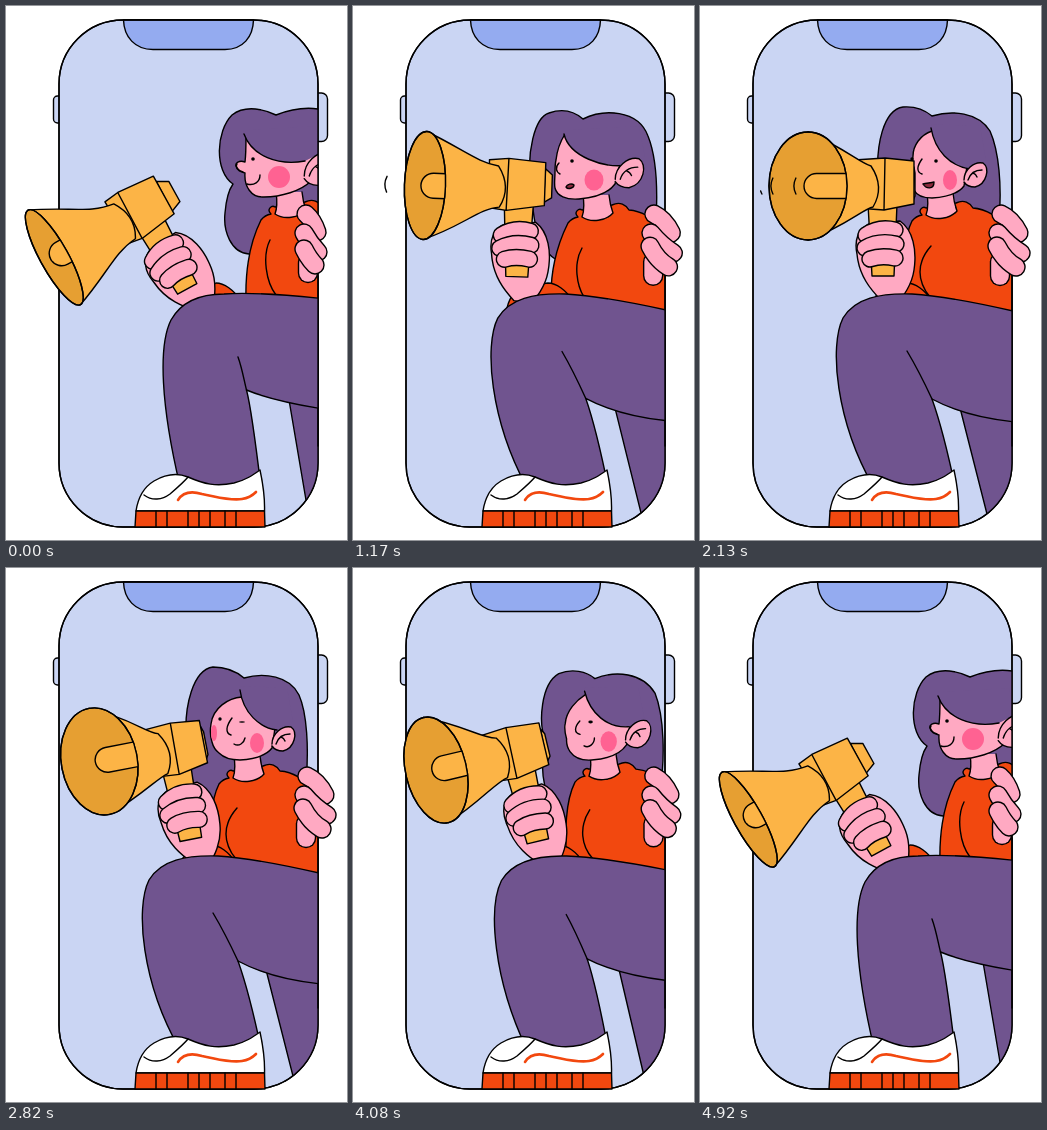
Recreate the animation shown at these times as an HTML page. Size 341 px wide and 534 px high, loop 4950 ms.

```html
<!DOCTYPE html>
<html lang="en">
<head>
<meta charset="utf-8">
<title>Megaphone</title>
<style>
html, body { margin: 0; width: 100%; height: 100%; overflow: hidden; background: #fff; }
svg { display: block; width: 100vw; height: 100vh; }
.ink { stroke: #000; stroke-width: 1.4; stroke-linejoin: round; stroke-linecap: round; }
.line { fill: none; }
.sky { fill: #cad5f3; }
.plum { fill: #70548f; }
.red { fill: #f2480f; }
.skin { fill: #ffa9c2; }
.gold { fill: #fcb446; }
.amber { fill: #e69f32; }
.blush { fill: #ff6292; stroke: none; }
#ear path { vector-effect: non-scaling-stroke; }
</style>
</head>
<body>
<svg viewBox="0 0 341 534">
  <defs>
    <clipPath id="screen"><rect x="53" y="14" width="259" height="507" rx="64"/></clipPath>
    <clipPath id="mouthClip"><ellipse class="mouthShape" ry="54"/></clipPath>
  </defs>

  <g class="ink">
    <rect class="sky" x="47.5" y="90" width="12" height="27" rx="4"/>
    <rect class="sky" x="302" y="87" width="19.5" height="48.5" rx="6"/>
    <rect class="sky" x="53" y="14" width="259" height="507" rx="64"/>
    <path fill="#94abf0" d="M117.5,14C118,31 129,43.5 147,43.5H219C237,43.5 247,31 247.5,14Z"/>
  </g>

  <g clip-path="url(#screen)" class="ink">
    <path id="backLeg" class="plum"/>
    <path id="hair" class="plum"/>
    <path id="shirt" class="red"/>
    <path id="neck" class="skin"/>
    <path id="fold" class="line"/>
    <path id="face" class="skin"/>
    <ellipse id="cheek" class="blush"/>
    <ellipse id="farCheek" class="blush" rx="3" ry="8"/>
    <path id="bangFill" class="plum" stroke="none"/>
    <path id="bang" class="line"/>
    <path id="nose" class="line"/>
    <path id="lips" fill="#8c2a3c"/>
    <ellipse id="eye" stroke="none"/>
    <circle id="farEye" r="1.7" stroke="none"/>
    <g id="ear">
      <path class="skin" d="M-11,6C-11,-4 -1,-13 8,-11C15,-6 12,10 0,13C-5,13 -9,11 -11,8"/>
      <path class="line" d="M-7,6C-5,0 0,-4 7,-4M-2,-1Q1,0 2,3"/>
    </g>
    <path id="sleeve" class="red"/>
  </g>
  <rect class="ink line" x="53" y="14" width="259" height="507" rx="64"/>

  <g id="mega" class="ink">
    <g class="grip">
      <path class="skin" d="M11,37C24,46 28,66 25,86C23,100 14,114 8,118L-8,116C-18,106 -30,92 -32,70C-35,56 -31,44 -18,39Z"/>
      <path class="gold" d="M-21,20L8,20L5,92L-17,92Z"/>
    </g>
    <path id="muzzle" class="gold"/>
    <path id="block" class="gold"/>
    <path id="cone" class="gold"/>
    <g id="mouth">
      <ellipse class="mouthShape amber" ry="54"/>
      <rect class="gold" clip-path="url(#mouthClip)" x="-4" y="-12.5" width="90" height="25" rx="12.5"/>
      <ellipse class="mouthShape line" ry="54"/>
      <g id="waves" class="line"></g>
    </g>
    <g class="grip" id="fist"></g>
  </g>

  <g clip-path="url(#screen)" class="ink">
    <path id="frontLeg" class="plum"/>
    <path id="crease" class="line"/>
  </g>
  <path class="ink line" d="M312,270V440"/>

  <g class="ink">
    <path fill="#fff" d="M130,505C132,492 138,481 148,475C160,468 172,467 182,471C198,478 210,481 228,477C240,474 247,469 254,464C257,478 259,490 258.5,505Z"/>
    <path class="line" d="M138,489C146,495 156,494 164,488C171,482 178,476 182,471"/>
    <path class="line" style="stroke:#f2480f;stroke-width:2.6" d="M172,494C177,486 186,485 196,488C212,491 224,495 236,493C243,492 247,489 250,486"/>
    <path class="red" d="M130,505H258.5L259,521H129Z"/>
    <path class="line" d="M150,505v16M161,505v16M182,505v16M193,505v16M204,505v16M219,505v16M230,505v16"/>
  </g>
  <g id="hold"></g>
</svg>

<script>
const LOOP = 4950;
const TIMES = [0, 570, 1170, 2130, 2800, 3600, 4440, 4905];
const ORDER = [0, 1, 2, 3, 4, 4, 5, 0];
const NUMBER = /-?\d+(\.\d+)?/g;
const $ = id => document.getElementById(id);
const numbers = s => s.match(NUMBER).map(Number);
const fill = (shape, list) => { let i = 0; return shape.replace(NUMBER, () => list[i++].toFixed(2)); };

// Poses: wind-up, call, loud, turned, wink, return
const PATHS = {
  hair: [
    "M270,109C290,101 315,98 335,112C350,150 345,200 330,230L243,248C225,247 217,225 219,207C220,195 222,185 227,178C208,165 210,125 226,109C240,98 260,104 270,109",
    "M243,113C268,101 295,106 312,130C322,150 322,200 312,230L213,252C195,245 193,215 194,200C194,195 194,188 195,184C184,165 185,122 202,112C215,104 235,106 243,113",
    "M230,113C250,103 285,103 295,130C303,150 305,180 303,215L205,255C180,240 182,210 178,190C177,185 177,180 177,170C175,150 180,112 196,107C210,102 222,106 230,113",
    "M232,110C252,104 278,106 290,125C299,145 302,180 299,215L205,260C195,240 183,215 180,195C179,190 178,180 178,170C176,140 183,104 203,101C216,100 226,105 232,110",
    "M238,110C258,104 284,108 293,127C301,145 303,180 300,215L207,260C195,240 186,215 183,195C181,190 180,180 180,165C179,140 186,102 207,99C221,99 231,104 238,110",
    "M248,111C270,101 297,101 314,122C325,150 325,200 315,230L228,250C205,245 196,225 199,205C200,195 203,185 208,178C193,165 191,125 205,110C218,101 238,103 248,111"
  ],
  face: [
    "M240,130C240,140 240,148 239,156C233,154 229,157 230,160C231,165 235,166 239,167C238,180 245,192 258,191C275,191 295,185 305,175L312,140",
    "M214,130C214,140 214,148 213,157C208,160 204,163 205,167C206,171 209,171 213,172C214,186 220,195 232,195C250,196 268,190 277,178L285,135",
    "M212,128C207,136 204,145 203,154C202,158 202,162 202,166C202,172 201,178 202,182C204,190 213,194 226,193C240,192 254,189 262,178L272,140",
    "M232,125C220,129 213,140 213,150C212,157 213,163 213,168C213,175 213,180 214,184C217,190 224,192 232,192C246,191 258,188 264,180L270,140",
    "M236,129C222,130 207,140 205,156C204,162 204,168 206,174C207,178 209,182 213,185C219,191 226,192 234,192C248,191 260,188 266,180L272,140",
    "M230,125C226,135 222,146 222,155C220,158 221,163 222,167C221,172 222,177 223,181C226,189 234,193 245,192C262,191 276,186 284,175L292,135"
  ],
  bang: [
    "M238,128C246,150 272,160 299,155", "M213,128C220,150 245,164 276,160",
    "M211,128C216,150 250,163 276,159", "M231,122C235,145 250,160 270,163",
    "M234,122C237,145 254,160 271,162", "M230,125C238,148 256,160 282,156"
  ],
  nose: [
    "M231,158C229,160 232,165 237,166", "M206,163C204,166 207,171 211,171",
    "M206,157C202,161 203,166 207,168", "M222,153C217,160 216,166 222,168",
    "M226,150C220,158 219,165 225,167", "M228,156C223,160 224,165 230,166"
  ],
  lips: [
    "M241,178C248,180 254,176 254,169C254,176 248,180 241,178", "M220,181C222,178 226,179 227,183C227,188 221,189 220,181",
    "M213,181C214,178 219,177 221,179C221,182 215,184 213,181", "M223,178C226,177 231,177 234,176C234,184 226,183 223,178",
    "M228,176C233,179 238,175 239,170C238,175 233,179 228,176", "M235,179C240,182 246,176 245,170C246,176 240,182 235,179"
  ],
  fold: [
    "M264,234C256,250 260,276 270,289", "M241,248C237,262 239,280 243,290", "M229,242C220,258 224,280 231,291",
    "M231,240C216,257 217,275 230,291", "M231,240C216,257 217,275 230,291", "M245,243C238,260 242,280 252,290"
  ]
};

const VALUES = {
  // angle, block x, block y, mouth distance, mouth radius, mouth offset, grip shift, muzzle, block half width
  mega: ["-29 141 200 106 14 0 1 11 20", "-1 168.5 179 108 13 6 4 9 20", "2 173 179 101 20.5 4 0 7 19",
         "0 199 178 91 39 2 -10 1 15", "-11 183 178 91 38 -2 -10 2 15", "-17 163 186 98 22 0 -1 5 19"],
  // neck x, neck y, shirt edge, sleeve left, sleeve right, lean
  torso: ["269 208 240 185 210 0", "244 210 208 157 195 0.55", "229 211 198 153 195 0.92",
          "226 209 206 170 207 1", "227 210 206 171 205 1", "248 207 223 195 207 0.44"],
  // cheek x, y, rx, ry, eye x, y, rx, ry
  look: ["273 171 11 11 247 153 1.8 1.8", "248 176 11 11 221 157 1.8 1.8", "241 174 9.5 10.5 219 155 1.8 1.8",
         "250 174 7 10 236 155 1.8 1.8", "251 175 7 10 236 154 3 0.8", "262 172 9.5 10.5 240 154 1.8 1.8"],
  // ear x, y, half width, half height, far eye x, y, shown
  side: ["312 162 15 16 238 153 0", "288 165 16 16 212 157 0", "276 166 15 14.5 203 155 0",
         "275 168 12 12 212 153 1", "277 170 12 12 214 151 1", "295 162 14.5 15 222 154 0"]
};

const LEAN = {
  backLeg: ["M282,388L301,500L330,500L330,388", "M257,390L288,512L330,512L330,390"],
  frontLeg: [
    "M330,294C285,289 245,286 218,288C190,288 174,298 165,314C152,340 155,400 174,480L256,490C250,440 246,405 240.5,384C262,393 290,399 330,405",
    "M330,309C280,297 245,290 212,288C180,287 155,292 143,312C129,340 136,415 173,480L256,485C247,442 241,418 232,393C258,407 290,415 330,417"
  ],
  crease: ["M232,351C236,362 238,374 240.5,384", "M207,345C216,360 225,378 232,393"]
};
const HOLD = [
  ["M302,257Q302,262 302,267", "M300,256Q300,262 300,270", 19],
  ["M300,208Q307,214 311,226", "M301,208Q312,213 319,227", 18],
  ["M298,227Q304,238 312,246", "M298,227Q308,239 321,247", 18],
  ["M298,243Q303,253 309,259", "M297,240Q304,254 316,261", 18]
];
const FIST = ["M-23,51Q-10,42 6,46", "M-24,64Q-10,56 7,60", "M-19,75Q-8,71 6,74"];
const WAVES = [510, 790, 1180, 1480, 1670, 1780, 2010];

function add(parent, attrs) {
  const node = document.createElementNS("http://www.w3.org/2000/svg", "path");
  set(node, attrs);
  return parent.appendChild(node);
}
function set(node, attrs) { for (const k in attrs) node.setAttribute(k, attrs[k]); }

// A finger is a thick skin stroke over a slightly thicker black one.
function finger(parent, d, width) {
  return [["#000", width + 1.4], ["#ffa9c2", width - 1.4]].map(([stroke, w]) =>
    add(parent, { d, fill: "none", "stroke-linecap": "round", style: `stroke:${stroke};stroke-width:${w}` }));
}

FIST.forEach(d => finger($("fist"), d, 16));
const holdFingers = HOLD.map(([d, , width]) => finger($("hold"), d, width));
const waveNodes = WAVES.map(() => add($("waves"), { d: "M0,-8Q-4,0 0,8", pathLength: 1, "stroke-dasharray": "1 2" }));

const track = poses => {
  const keys = poses.map(numbers);
  return keys[0].map((_, n) => ORDER.map(k => keys[k][n]));
};
const mapValues = (o, f) => Object.fromEntries(Object.entries(o).map(([k, v]) => [k, f(v)]));
const pathTracks = mapValues(PATHS, track), valueTracks = mapValues(VALUES, track);

function slope(v, i) {
  if (i === 0 || i === TIMES.length - 1) return 0;
  const a = (v[i] - v[i - 1]) / (TIMES[i] - TIMES[i - 1]);
  const b = (v[i + 1] - v[i]) / (TIMES[i + 1] - TIMES[i]);
  return a * b <= 0 ? 0 : 2 * a * b / (a + b);
}
// Smooth curve through the keys without overshoot
function at(v, t) {
  t = Math.min(t, TIMES[TIMES.length - 1]);
  let i = 0;
  while (i < TIMES.length - 2 && t >= TIMES[i + 1]) i++;
  const h = TIMES[i + 1] - TIMES[i], u = (t - TIMES[i]) / h, w = 1 - u;
  return v[i] * (1 + 2 * u) * w * w + v[i + 1] * u * u * (3 - 2 * u)
    + h * u * w * (slope(v, i) * w - slope(v, i + 1) * u);
}
function lean([from, to], p) {
  const end = numbers(to);
  return fill(from, numbers(from).map((n, i) => n + (end[i] - n) * p));
}

function drawMega([angle, x, y, d, r, my, grip, m, w], t) {
  set($("mega"), { transform: `translate(${x} ${y}) rotate(${angle})` });
  set($("mouth"), { transform: `translate(${-d} ${my})` });
  document.querySelectorAll(".mouthShape").forEach(n => set(n, { rx: r }));
  document.querySelectorAll(".grip").forEach(n => set(n, { transform: `translate(${grip} 0)` }));
  const back = -34 - (r - 12) * .4;
  set($("block"), { d: `M${back},-24L${-w + 1},-26L${w},-23L${w},20L${-w},26L${back + 2},24ZM${-w + 1},-26L${-w},26` });
  set($("muzzle"), { d: `M${w},-17L${w + m},-11L${w + m},12L${w - 1},17Z` });
  set($("cone"), { d: `M${-d},${my - 54}C${-d + 38},${my - 37} ${-d + 52},-21 -28,-18Q-14,3 -26,23C${-d + 55},25 ${-d + 38},${my + 40} ${-d},${my + 54}Z` });
  WAVES.forEach((birth, i) => {
    const age = t - birth;
    set(waveNodes[i], {
      visibility: age > 40 && age < 480 ? "visible" : "hidden",
      transform: `translate(${-age * .1} 0)`,
      "stroke-dashoffset": -Math.max(0, (age - 380) / 100)
    });
  });
}

function drawTorso([x, y, edge, left, right, p]) {
  set($("shirt"), { d: `M${edge},296C${edge - 1},262 ${x - 24},${y + 26} ${x - 14},${y + 6}Q${x - 10},${y + 1} ${x - 4},${y}C${x - 9},${y - 5} ${x - 3},${y - 9} ${x},${y - 7}L${x + 30},${y - 12}C${x + 38},${y - 16} ${x + 44},${y - 12} ${x + 47},${y - 7}C${x + 62},${y - 6} ${x + 76},${y + 4} ${x + 90},${y + 20}L350,312Z` });
  set($("neck"), { d: `M${x + 1},${y - 22}Q${x + 3},${y - 8} ${x},${y}C${x + 9},${y + 6} ${x + 24},${y + 4} ${x + 31},${y - 4}Q${x + 28},${y - 12} ${x + 27},${y - 22}` });
  set($("sleeve"), { d: `M${left},308C${left + 2},290 ${left + 10},283 ${left + 20},280L${right},277C${right + 8},277 ${right + 18},284 ${right + 24},294Z` });
  for (const id in LEAN) set($(id), { d: lean(LEAN[id], p) });
  HOLD.forEach((pair, i) => holdFingers[i].forEach(n => set(n, { d: lean(pair, p) })));
}

function drawFace(look, side, bang) {
  const [cx, cy, crx, cry, ex, ey, erx, ery] = look;
  const [sx, sy, srx, sry, fx, fy, shown] = side;
  const visibility = shown > .5 ? "visible" : "hidden";
  set($("bangFill"), { d: `${$("bang").getAttribute("d")}L${bang[6] + 16},${bang[7] - 8}L${bang[6] + 10},120L${bang[0]},${bang[1] - 4}Z` });
  set($("cheek"), { cx, cy, rx: crx, ry: cry });
  set($("eye"), { cx: ex, cy: ey, rx: erx, ry: ery });
  set($("ear"), { transform: `translate(${sx} ${sy}) scale(${srx / 12} ${sry / 12})` });
  set($("farEye"), { cx: fx, cy: fy, visibility });
  set($("farCheek"), { cx: fx - 6, cy: fy + 14, visibility });
}

function draw(t) {
  const now = list => list.map(v => at(v, t));
  const { mega, torso, look, side } = mapValues(valueTracks, now);
  for (const id in PATHS) set($(id), { d: fill(PATHS[id][0], now(pathTracks[id])) });
  drawMega(mega, t);
  drawTorso(torso);
  drawFace(look, side, now(pathTracks.bang));
}

const start = performance.now();
function tick() {
  draw((performance.now() - start) % LOOP);
  requestAnimationFrame(tick);
}
tick();
</script>
</body>
</html>
```
